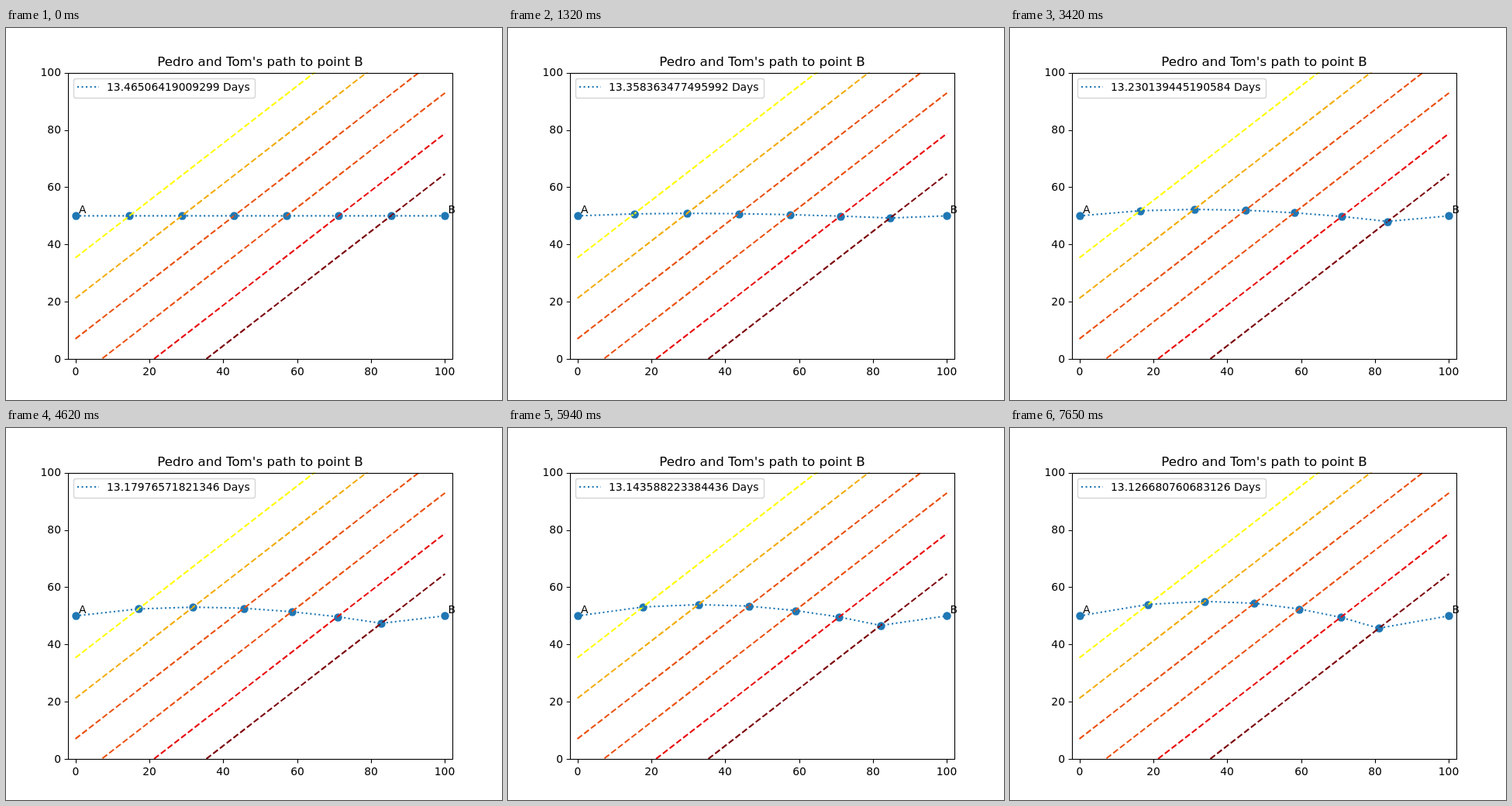
Recreate the animation shown at these times as an HTML page. Size 640 by 480 pixels, loop 9650 ms.

```html
<!DOCTYPE html>
<html lang="en">
<head>
<meta charset="utf-8">
<title>Path to point B</title>
<style>
  html, body { margin: 0; width: 100%; height: 100%; overflow: hidden; background: #fff; }
  svg { display: block; width: 640px; height: 480px; }
  text { font: 13.889px "DejaVu Sans", sans-serif; white-space: pre; }
  .title { font-size: 16.667px; }
  .axis { fill: none; stroke: #000; stroke-width: 1.11; }
  .border { fill: none; stroke-width: 2.083; stroke-dasharray: 7.708 3.333; }
  .route { fill: none; stroke: #1f77b4; stroke-width: 2.083; stroke-dasharray: 2.083 3.4375; stroke-linejoin: round; }
  .dot { fill: #1f77b4; }
  .box { fill: #fff; fill-opacity: .8; stroke: #ccc; stroke-opacity: .8; stroke-width: 1.389; }
</style>
</head>
<body>
<svg id="stage" viewBox="0 0 640 480">
  <clipPath id="plot"><rect x="80" y="57.6" width="496" height="369.6"/></clipPath>
</svg>
<script>
const STEP = 30, LAST = 255, LOOP = 9650;
const FIRST_DAYS = 13.46506419009299, BEST_DAYS = 13.126680760683126;

// each border's colour and how far the best route crosses it from y = 50
const BORDERS = [
  { color: "#ffff00", bend: 4 },
  { color: "#f2ac0a", bend: 5.05 },
  { color: "#ea5010", bend: 4.4 },
  { color: "#ea5010", bend: 2.4 },
  { color: "#e80c10", bend: -0.5 },
  { color: "#7b0008", bend: -4.3 }
];

const stage = document.getElementById("stage");
const px = x => 80 + (x + 2) * 496 / 104;
const py = y => 427.2 - y * 3.696;
const snap = v => Math.floor(v + 0.5) + 0.5;
const offset = i => (2.5 - i) * 10 * Math.SQRT2;
const mix = (a, b, u) => a + (b - a) * u;

function set(el, attrs) {
  for (const name in attrs) el.setAttribute(name, attrs[name]);
  return el;
}
function add(tag, attrs, text = "") {
  const el = document.createElementNS("http://www.w3.org/2000/svg", tag);
  el.textContent = text;
  return stage.appendChild(set(el, attrs));
}
const label = (x, y, text, anchor = "start", cls = "") =>
  add("text", { x, y, "text-anchor": anchor, class: cls }, text);
const place = (dot, x, y) => set(dot, { cx: snap(px(x)), cy: snap(py(y)) });
const addDot = () => add("circle", { class: "dot", r: 5.2 });

place(addDot(), 0, 50);
place(addDot(), 100, 50);
const dots = BORDERS.map(addDot);

BORDERS.forEach(({ color }, i) => {
  const c = offset(i);
  // lines start at the picture's lower edge, which sets their dash phase
  const x = Math.max(0, (427.2 - 481) / 3.696 - c);
  add("path", {
    class: "border", stroke: color, "clip-path": "url(#plot)",
    d: `M${px(x)} ${py(x + c)}L${px(100)} ${py(100 + c)}`
  });
});
const route = add("path", { class: "route" });

add("rect", { class: "axis", x: 80.5, y: 58.5, width: 496, height: 369 });
for (let v = 0; v <= 100; v += 20) {
  add("path", { class: "axis", d: `M${snap(px(v))} 427.5V432.4M80.5 ${snap(py(v))}H75.6` });
  label(Math.round(px(v)), 448, v, "middle");
  label(71, Math.floor(py(v) + 5), v, "end");
}
label(94, 239, "A");
label(570.5, 239, "B");
label(328, 49, "Pedro and Tom's path to point B", "middle", "title");

const box = add("rect", { class: "box", x: 87.5, y: 65.5, height: 25, rx: 2.78 });
add("path", { class: "route", d: "M92 76H120" });
const days = label(130, 81, "");

function draw(step) {
  const u = step / LAST;
  let d = `M${px(0)} ${py(50)}`;
  dots.forEach((dot, i) => {
    const y = 50 + BORDERS[i].bend * u, x = y - offset(i);
    place(dot, x, y);
    d += `L${px(x)} ${py(y)}`;
  });
  set(route, { d: `${d}L${px(100)} ${py(50)}` });

  // gains shrink as the route nears its best
  days.textContent = `${mix(BEST_DAYS, FIRST_DAYS, (1 - u) ** 2)} Days`;
  set(box, { width: Math.round(days.getComputedTextLength() + 49) });
}

let shown = -1;
function tick() {
  const step = Math.min(LAST, Math.floor(performance.now() % LOOP / STEP));
  if (step !== shown) draw(shown = step);
  requestAnimationFrame(tick);
}
tick();
</script>
</body>
</html>
```
